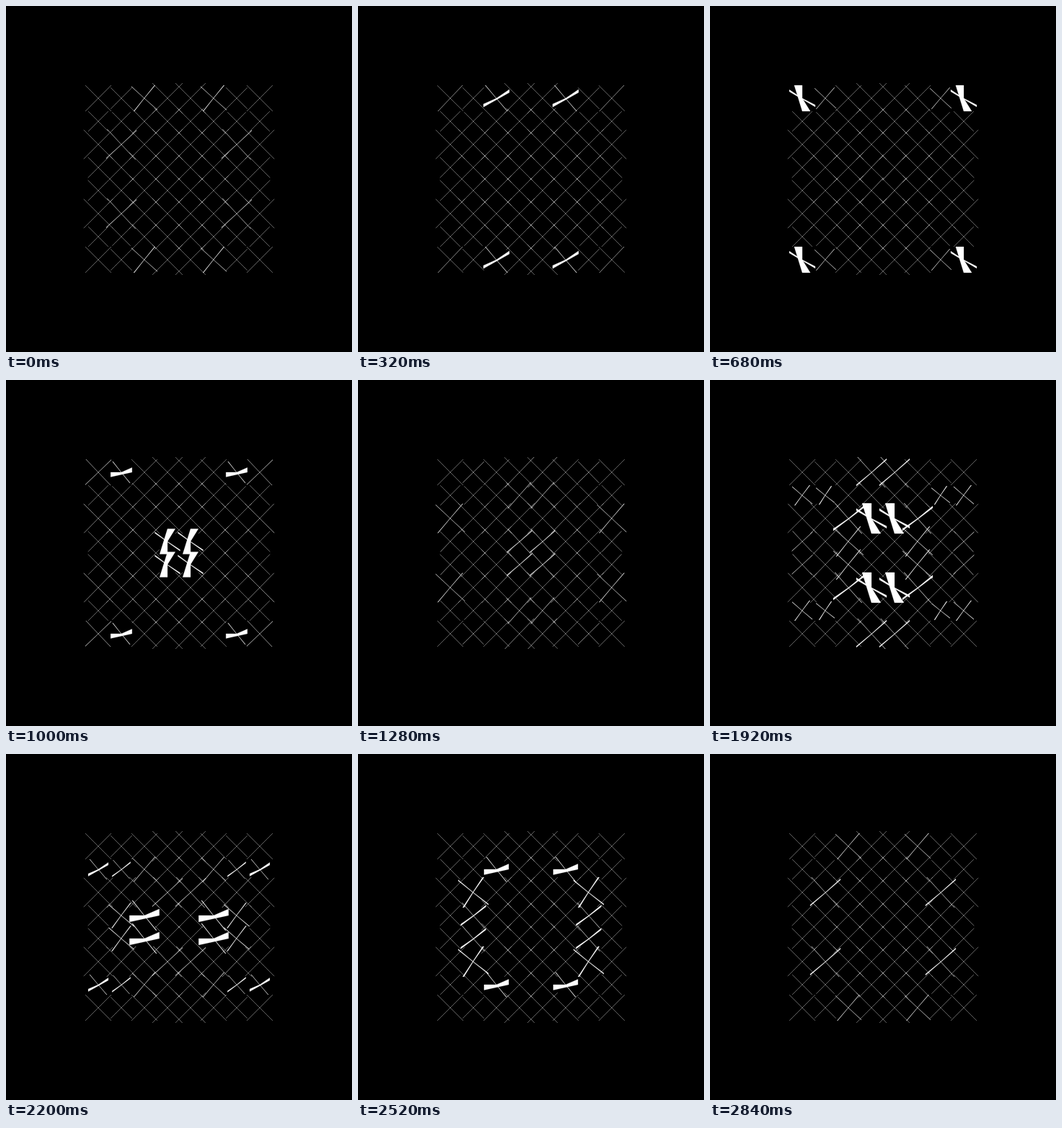
Animation, 480 px wide and 480 px high, one loop 2.88 s. Source, as an HTML page:

```html
<!DOCTYPE html>
<html lang="en">
<head>
<meta charset="utf-8">
<title>Turning lattice</title>
<style>
html, body { margin: 0; width: 100%; height: 100%; overflow: hidden; background: #000; }
svg { display: block; width: 100%; height: 100%; }
path { fill: #fff; stroke: #fff; stroke-width: .22; stroke-linejoin: round; }
</style>
</head>
<body>
<svg id="stage" viewBox="0 0 480 480"></svg>
<script>
const STEP = 40, STEPS = 72, PITCH = 32, LEAD = 20;

// Step at which each cell of one quadrant turns, from the centre outwards.
const TURN_AT = [
  [26, 52, 58, 41],
  [48, 43, 65, 37],
  [38, 60, 50, 51],
  [42, 4, 22, 17]
];
const ROW_SIZE = [17.5, 23, 15.5, 18];

const stage = document.getElementById('stage');
const cells = [];

// Half the side of a cell: a wave along each row, shifted from row to row.
const halfSide = (r, c) => Math.min(21, ROW_SIZE[r] + 3.2 * Math.cos(Math.PI / 2 * (c - 1 + r / 3)));

function addPath() {
  const path = document.createElementNS('http://www.w3.org/2000/svg', 'path');
  stage.appendChild(path);
  return path;
}

for (let row = 0; row < 8; row++) {
  for (let col = 0; col < 8; col++) {
    const r = Math.floor(Math.abs(row - 3.5));
    const c = Math.floor(Math.abs(col - 3.5));
    cells.push({
      x: 240 + (col - 3.5) * PITCH,
      y: 240 + (row - 3.5) * PITCH,
      half: halfSide(r, c),
      turnAt: TURN_AT[r][c],
      rising: addPath(),
      falling: addPath()
    });
  }
}

// Progress 0..1 that creeps up to a quick turn at u = 0 and settles after it.
function ease(u, gap, before, after) {
  if (u === 0) return .5;
  return u < 0 ? gap * Math.exp(before * u) : 1 - gap * Math.exp(-after * u);
}
const rise = k => ease(k + 1, .25, .27, .27);
const fall = k => ease(k - 2, .5, .36, .58);

// Area swept by a bar through the centre while its end moves from a to b.
function sweep({ x, y }, a, b) {
  const neg = p => [-p[0], -p[1]];
  const points = [a, b, neg(a), neg(b), [0, 0]];
  return 'M' + points.map(p => (x + p[0]).toFixed(2) + ' ' + (y + p[1]).toFixed(2)).join('L') + 'Z';
}

function draw(step) {
  for (const cell of cells) {
    const h = cell.half;
    const k = (step - cell.turnAt + STEPS + LEAD) % STEPS - LEAD;
    const top = i => [h * (1 - 2 * rise(i)), -h];
    const side = i => [-h, h * (2 * fall(i) - 1)];
    cell.rising.setAttribute('d', sweep(cell, top(k - 1), top(k)));
    cell.falling.setAttribute('d', sweep(cell, side(k - 1), side(k)));
  }
}

let shown = -1;
const start = performance.now();

function tick() {
  const step = Math.floor(Math.max(0, performance.now() - start) / STEP) % STEPS;
  if (step !== shown) draw(shown = step);
  requestAnimationFrame(tick);
}
tick();
</script>
</body>
</html>
```
